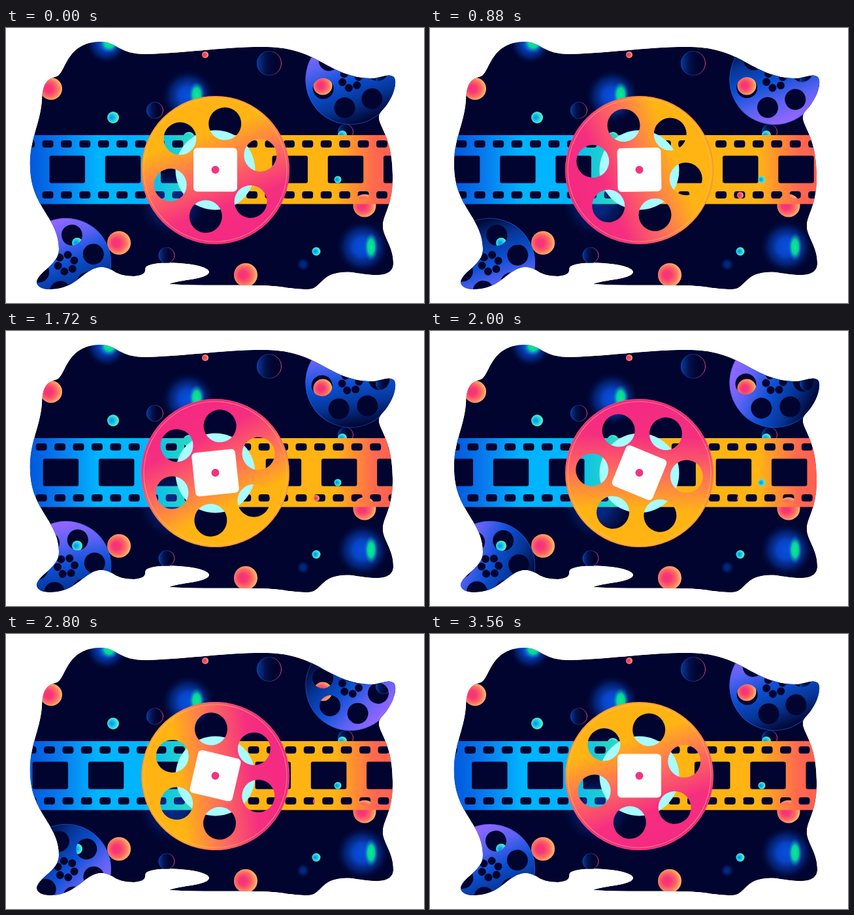
Write an HTML page with a canvas that moves like this. It is 640 px wide and 421 px high and loops after 3.6 s.

```html
<!DOCTYPE html>
<html lang="en">
<head>
<meta charset="utf-8">
<title>Film reels</title>
<style>
html, body { margin: 0; width: 100%; height: 100%; overflow: hidden; background: #fff; }
canvas { display: block; }
</style>
</head>
<body>
<canvas id="stage" width="640" height="421"></canvas>
<script>
const ctx = document.getElementById('stage').getContext('2d');
const TAU = Math.PI * 2;
const NIGHT = '#00042e';
const LOOP = 3600, STEP = 40, LAST_STEP = LOOP / STEP - 1;
const FRAME_PITCH = 85.25, STRIP_SHIFT = 509;

const blob = new Path2D(`M37 215C35 170 52 150 55 110C56 85 62 78 78 74C92 68 92 21 145 21
  C172 22 172 40 215 40C290 37 340 28 400 29C478 30 495 76 560 77C580 75 586 69 594 75
  C602 86 588 115 575 127C560 145 592 155 592 225C593 272 577 285 577 303
  C577 320 594 335 593 362C591 385 555 378 530 374C480 370 485 400 462 400
  C435 400 425 395 390 394C340 393 300 395 250 392C265 385 311 385 311 373
  C308 360 235 355 217 364C208 367 222 378 196 380C165 380 165 367 147 366
  C120 366 110 399 70 400C50 401 43 391 49 383C56 370 81 360 81 338C80 290 39 275 37 215Z`);

const PINK = ['#f5307c', '#f83a74', '#ff6c60', '#ffbc70'];
const TEAL = ['#0a90f0', '#10b0ee', '#30dcd8', '#70f0c4'];
const REEL_HUES = ['#f52882', '#f52f80', '#ff6e5c', '#ffb414', '#ffb414'];
const SPOOL_HUES = ['#9966ff', '#5a62f4', '#0c50d4', '#063596', NIGHT];
const GLOW = ['#0850e0', 'rgba(8,76,216,.9)', 'rgba(6,56,170,.5)', 'rgba(0,4,46,0)'];
const GREEN = ['#08ee90', 'rgba(8,225,150,.9)', 'rgba(8,120,210,0)'];

function shade(gradient, hues) {
  hues.forEach((hue, i) => gradient.addColorStop(i / (hues.length - 1), hue));
  return gradient;
}

function disc(x, y, r, fill) {
  ctx.beginPath();
  ctx.arc(x, y, r, 0, TAU);
  ctx.fillStyle = fill;
  ctx.fill();
}

function ring(x, y, r, stroke, width) {
  ctx.beginPath();
  ctx.arc(x, y, r, 0, TAU);
  ctx.strokeStyle = stroke;
  ctx.lineWidth = width;
  ctx.stroke();
}

function bubble(x, y, r, hues) {
  disc(x, y, r, shade(ctx.createRadialGradient(x - r * .3, y, 0, x - r * .1, y, r * 1.1), hues));
}

function glow(x, y, r, hues = GLOW, squeeze = 1) {
  ctx.save();
  ctx.translate(x, y);
  ctx.scale(squeeze, 1);
  disc(0, 0, r, shade(ctx.createRadialGradient(0, 0, 0, 0, 0, r), hues));
  ctx.restore();
}

function moon(x, y, r) {
  const across = () => ctx.createLinearGradient(x - r, y, x + r, y);
  disc(x, y, r, shade(across(), ['#083a9c', '#03124c', NIGHT, NIGHT]));
  ring(x, y, r - .5, shade(across(), ['#0848b0', '#08286c', '#f0407c']), 1);
}

function scenery() {
  ctx.fillStyle = NIGHT;
  ctx.fill(blob);
  glow(154, 23, 33);
  glow(158, 23, 15, GREEN);
  glow(279, 104, 42);
  glow(292, 102, 20, GREEN, .6);
  glow(546, 335, 42);
  glow(559, 335, 22, GREEN, .48);
  ctx.globalAlpha = .5;
  glow(255, 268, 56);
  glow(455, 362, 11);
  ctx.globalAlpha = 1;
  for (const [x, y, r] of [[403, 54, 19], [228, 126, 13], [246, 348, 12.5],
    [520, 159, 12], [578, 80, 12]]) moon(x, y, r);
  for (const [x, y, r] of [[69, 93, 17], [305, 41, 5], [173, 329, 18], [367, 378, 18],
    [549, 272, 17.5], [475, 256, 5], [485, 88, 14.5]]) bubble(x, y, r, PINK);
  for (const [x, y, r] of [[164, 137, 9], [475, 342, 6.5], [515, 164, 7],
    [280, 168, 9], [109, 329, 8]]) bubble(x, y, r, TEAL);
}

function strip(shift) {
  const fill = ctx.createLinearGradient(36, 0, 592, 0);
  [[0, '#0058dc'], [.08, '#0878ec'], [.19, '#00b4ff'], [.31, '#00b4ff'], [.44, '#28d8c0'],
    [.57, '#ffb414'], [.84, '#ffb414'], [.95, '#ff6850'], [1, '#ff6050']]
    .forEach(([at, hue]) => fill.addColorStop(at, hue));
  ctx.beginPath();
  ctx.rect(-200, 164, 1100, 105.5);
  for (let x = shift % FRAME_PITCH - FRAME_PITCH; x < 680; x += FRAME_PITCH) {
    ctx.roundRect(x, 195.5, 54.5, 42, 3);
    for (let i = 0; i < 3; i++) {
      const hole = x - 11 + i * FRAME_PITCH / 3;
      ctx.roundRect(hole, 172, 17, 11, 4);
      ctx.roundRect(hole, 250, 17, 11, 4);
    }
  }
  ctx.fillStyle = fill;
  ctx.fill('evenodd');
}

function holes(count, distance, r) {
  for (let i = 0; i < count; i++) {
    const a = i * TAU / count, x = distance * Math.sin(a), y = -distance * Math.cos(a);
    ctx.moveTo(x + r, y);
    ctx.arc(x, y, r, 0, TAU);
  }
}

// Wheel with see-through holes; hueAngle points to the first hue, clockwise from the top.
function wheel(r, hues, hueAngle, cutHoles) {
  const x = r * Math.sin(hueAngle), y = -r * Math.cos(hueAngle);
  ctx.beginPath();
  ctx.arc(0, 0, r, 0, TAU);
  cutHoles();
  ctx.fillStyle = shade(ctx.createLinearGradient(x, y, -x, -y), hues);
  ctx.fill('evenodd');
}

function turned(x, y, angle, draw) {
  ctx.save();
  ctx.translate(x, y);
  ctx.rotate(angle);
  draw();
  ctx.restore();
}

const HOLE_OFFSET = 11.7 / 360 * TAU;

function spool(x, y, turn) {
  turned(x, y, HOLE_OFFSET - 2 * turn, () => {
    wheel(69, SPOOL_HUES, 327 / 360 * TAU, () => {
      holes(6, 44, 16);
      holes(6, 13, 6);
    });
    ring(0, 0, 68.5, 'rgba(40,90,230,.6)', 1);
  });
}

function mainReel(turn) {
  disc(320.5, 217.5, 61, '#a8fbff');
  turned(320.5, 217.5, HOLE_OFFSET + turn, () => {
    wheel(113.5, REEL_HUES, 148 / 360 * TAU, () => holes(6, 72.5, 25));
    ring(0, 0, 109.5, 'rgba(255,190,110,.55)', 1.2);
    ring(0, 0, 113, 'rgba(240,80,130,.55)', 1);
  });
  turned(320.5, 217, turn, () => {
    ctx.beginPath();
    ctx.roundRect(-33.5, -33.5, 67, 67, 6);
    ctx.fillStyle = '#fff';
    ctx.fill();
    disc(0, 0, 6, '#f0357f');
  });
}

function render(now) {
  const progress = Math.floor(now % LOOP / STEP) / LAST_STEP;
  const turn = progress * TAU;
  ctx.clearRect(0, 0, 640, 421);
  ctx.save();
  ctx.clip(blob);
  scenery();
  strip(66.5 + progress * STRIP_SHIFT);
  bubble(508, 232, 5.5, TEAL);
  spool(527.5, 79, turn);
  spool(92, 360, turn);
  mainReel(turn);
  ctx.restore();
}

let start;
function tick(now) {
  start ??= now;
  render(now - start);
  requestAnimationFrame(tick);
}
render(0);
requestAnimationFrame(tick);
</script>
</body>
</html>
```
